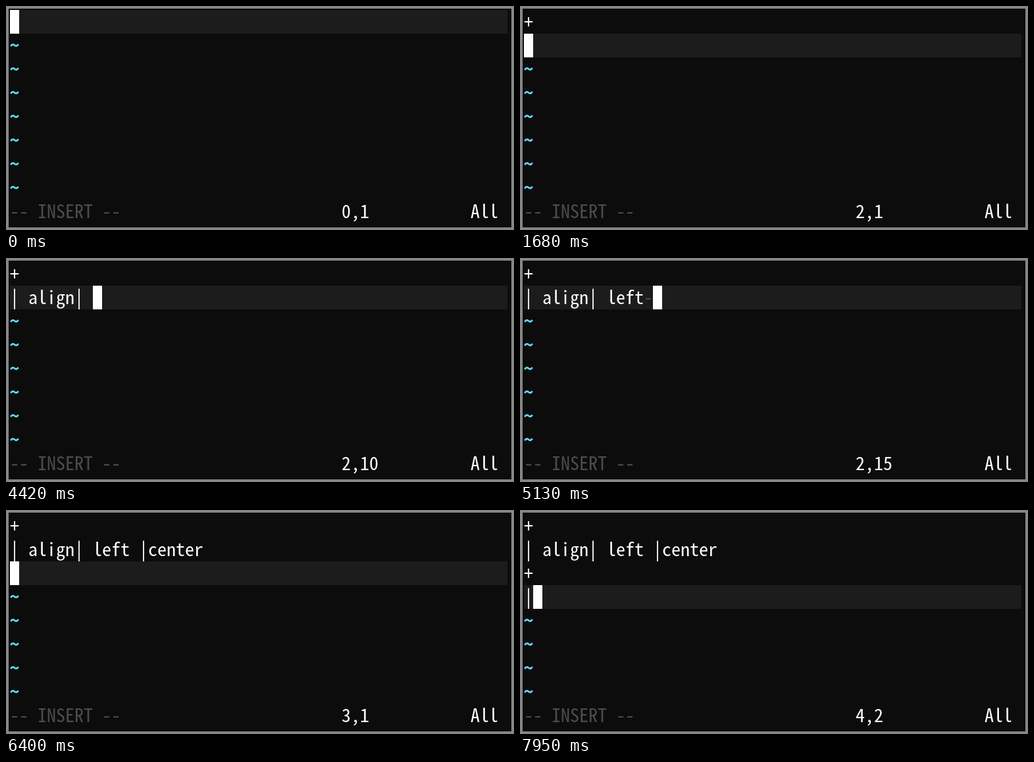
An HTML page for the animation above (8 s loop, 772x340 px).

```html
<!DOCTYPE html>
<html lang="en">
<head>
<meta charset="utf-8">
<title>Typing a table</title>
<style>
  html, body { margin: 0; width: 100%; height: 100%; overflow: hidden; background: #868686; }
  svg { display: block; width: 772px; height: 340px; }
  text {
    font: 28px "Noto Sans Mono CJK JP", "Noto Sans Mono CJK SC", "Noto Sans Mono", monospace;
    font-variant-ligatures: none;
    white-space: pre;
    fill: #fff;
  }
  .dim { fill: #4c4c4c; }
  .tilde { fill: #5fd7ff; font-weight: bold; }
</style>
</head>
<body>
<svg viewBox="0 0 772 340">
  <rect x="4" y="4" width="764" height="332" fill="#0c0c0c"/>
  <rect id="band" x="6" width="756" height="36" fill="#1c1c1c"/>
  <g id="rows"></g>
  <rect id="caret" width="14" height="36" fill="#fff"/>
</svg>
<script>
const LOOP = 8000, LEFT = 6, TOP = 6, CELL = 14, LINE = 36, BASE = 28, ROWS = 8;

// [time in ms, keys typed]; \b deletes the last character
const KEYS = [
  [1500, '+'], [1680, '\n'], [1880, '|'], [2640, ' '],
  [2960, 'a'], [3050, 'l'], [3130, 'i'], [3240, 'g'], [3320, 'n'],
  [3720, '|'],
  [4420, ' '], [4520, 'l'], [4620, 'e'], [4720, 'f'], [4870, 't'],
  [5130, '-'], [5310, '\b |'],
  [5700, 'c'], [5750, 'e'], [5890, 'n'], [5980, 't'], [6070, 'e'], [6160, 'r'],
  [6400, '\n'], [7110, '+'], [7470, '\n'], [7950, '|']
];

const $ = id => document.getElementById(id);
const band = $('band'), caret = $('caret'), holder = $('rows');

function addText(col, row, content = '', className = '') {
  const node = document.createElementNS('http://www.w3.org/2000/svg', 'text');
  node.setAttribute('x', LEFT + col * CELL);
  node.setAttribute('y', TOP + row * LINE + BASE);
  node.setAttribute('class', className);
  node.textContent = content;
  holder.append(node);
  return node;
}

const lines = Array.from({ length: ROWS }, (_, row) => addText(0, row));
const pending = addText(0, 1, '-', 'dim');
addText(0, ROWS, '-- INSERT --', 'dim');
const ruler = addText(36, ROWS);
addText(50, ROWS, 'All');

function bufferAt(time) {
  let text = '';
  for (const [start, keys] of KEYS) {
    if (time < start) break;
    for (const key of keys) text = key === '\b' ? text.slice(0, -1) : text + key;
  }
  return text;
}

let shown = null;
function draw(buffer) {
  const content = buffer.split('\n');
  const row = content.length - 1, col = content[row].length;
  const isPending = buffer.endsWith('-');

  lines.forEach((node, i) => {
    node.textContent = i > row ? '~' : content[i].replace('-', '');
    node.setAttribute('class', i > row ? 'tilde' : '');
  });
  pending.setAttribute('visibility', isPending ? 'visible' : 'hidden');
  pending.setAttribute('x', LEFT + (col - 1) * CELL);
  band.setAttribute('y', TOP + row * LINE);
  caret.setAttribute('x', LEFT + col * CELL);
  caret.setAttribute('y', TOP + row * LINE);
  ruler.textContent = `${buffer ? row + 1 : 0},${col + 1}`;
}

function tick() {
  const buffer = bufferAt(performance.now() % LOOP);
  if (buffer !== shown) draw(shown = buffer);
  requestAnimationFrame(tick);
}
tick();
</script>
</body>
</html>
```
